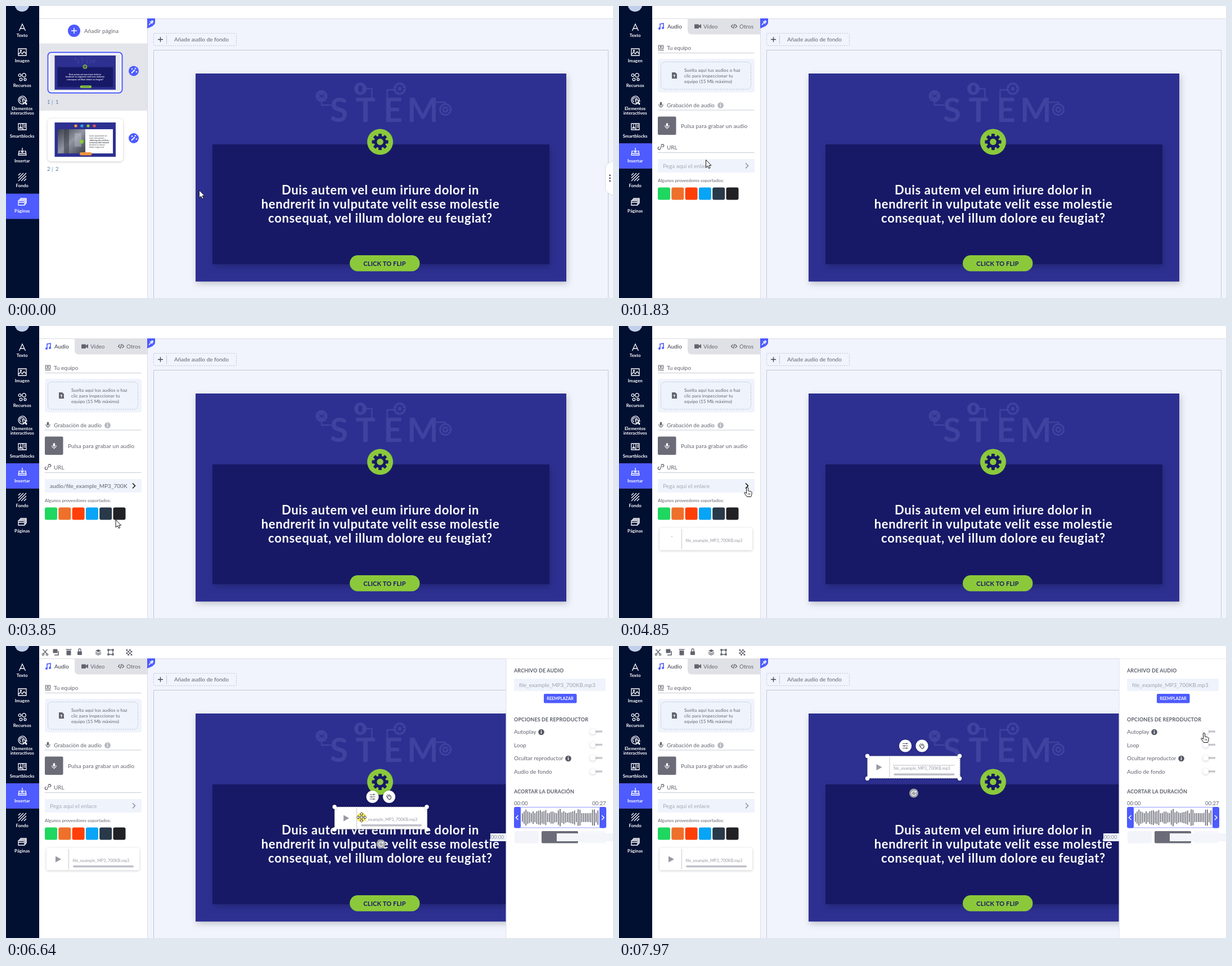
Animation of 1079x519 px, one loop 8000 ms. Source, as an HTML page:

```html
<!DOCTYPE html>
<html lang="es">
<head>
<meta charset="utf-8">
<style>
  html, body { margin: 0; width: 100%; height: 100%; overflow: hidden; background: #f1f4fc; }
  svg { display: block; width: 100%; height: 100%; font-family: Lato, sans-serif; }
  .menu { font-family: "Open Sans", sans-serif; }
  .soft { filter: drop-shadow(0 1px 2px #0003); }
  .deep { filter: drop-shadow(2px 4px 6px #0003); }
  .hard { filter: drop-shadow(2px 2px 1px #0006); }
</style>
</head>
<body>
<svg id="stage" viewBox="0 0 1079 519"></svg>
<script>
const BLUE = '#4d5bff', GREY = '#6b6c78', INK = '#62646f', PALE = '#eff3fc';
const NAVY = '#2d3091', DARK = '#171966', GREEN = '#8bc93b', GHOST = '#40429f';
const FILE = 'file_example_MP3_700KB.mp3';

// Drawing helpers: each returns SVG markup.
const rect = (x, y, w, h, fill, rx = 0, extra = '') =>
  `<rect x="${x}" y="${y}" width="${w}" height="${h}" fill="${fill}" rx="${rx}" ${extra}/>`;
const disc = (x, y, r, fill, extra = '') => `<circle cx="${x}" cy="${y}" r="${r}" fill="${fill}" ${extra}/>`;
const text = (x, y, str, size = 10, fill = INK, extra = '') =>
  `<text x="${x}" y="${y}" font-size="${size}" fill="${fill}" ${extra}>${str}</text>`;
const shape = (x, y, d, fill, extra = '') => `<path transform="translate(${x} ${y})" d="${d}" fill="${fill}" ${extra}/>`;
const icon = (x, y, d, color = '#fff', width = 1.3) => shape(x, y, d, 'none', `stroke="${color}" stroke-width="${width}"`);
const line = (x1, y1, x2, y2, color, width = 1) => icon(0, 0, `M${x1} ${y1}L${x2} ${y2}`, color, width);
const ring = (x, y, r) => `M${x - r} ${y}a${r} ${r} 0 1 0 ${2 * r} 0a${r} ${r} 0 1 0 ${-2 * r} 0`;
const box = (x, y, w, h) => `M${x} ${y}h${w}v${h}h${-w}z`;
const group = (id, body, extra = '') => `<g id="${id}" ${extra}>${body}</g>`;
const bold = 'font-weight="700"', mid = 'text-anchor="middle"';
const dashed = (color, gap = '2 2') => `stroke="${color}" stroke-dasharray="${gap}"`;

function gear(x, y, r, color, hole) {
  let teeth = '';
  for (let a = 0; a < 360; a += 45)
    teeth += rect(-r * .2, -r, r * .4, r * .5, color, r * .06, `transform="rotate(${a})"`);
  return `<g transform="translate(${x} ${y})">${teeth}${disc(0, 0, r * .74, color)}${disc(0, 0, r * .4, hole)}</g>`;
}

const info = (x, y, color) => disc(x, y, 5.3, color) + rect(x - .7, y - 1, 1.4, 4, '#fff') + disc(x, y - 2.6, .9, '#fff');
const wand = y => disc(227, y, 9, BLUE) + line(223, y + 4, 229, y - 2, '#fff', 2) +
  icon(227, y, 'M3-6v3M1.500-4.500h3M5 0v3M3.500 1.500h3M-3-5v3M-4.500-3.500h3', '#fff', 1);
const mic = (x, y, color) => rect(x - 1.7, y - 5, 3.4, 6.5, color, 1.7) + icon(x, y, 'M-3.500-1v1a3.500 3.500 0 0 0 7 0v-1M0 3.500v2', color, 1.1);

function slideArt() {
  const label = (y, str) => text(665.5, y, str, 22, '#fff', `${bold} ${mid} letter-spacing=".65"`);
  const letters = [['S', 592], ['T', 639], ['E', 688], ['M', 741]]
    .map(([c, x]) => text(x, 206, c, 59, GHOST, `${bold} ${mid}`)).join('');
  return rect(337, 120, 659, 369.5, NAVY) + letters +
    icon(0, 0, 'M561 165V176H578M636 147H650.500V164M695 149H677.500V164M757 171H781V178', GHOST, 2.5) +
    disc(561, 160, 10.5, GHOST) + icon(561, 160, ring(0, 0, 2) + 'M-6-5L6 5M6-5L-6 5M-6 0H6', NAVY, 1) +
    disc(630, 147, 11, GHOST) + rect(626.5, 141, 7, 12, NAVY, 3.5) +
    disc(700, 147, 11, GHOST) + gear(700, 147, 8, NAVY, GHOST) +
    disc(781, 184, 9.5, NAVY, `stroke="${GHOST}" stroke-width="3"`) + gear(781, 184, 6, GHOST, NAVY) +
    rect(367, 246, 599, 213, DARK, 0, 'class="deep"') +
    disc(665, 241.500, 23, GREEN) + gear(665, 241.500, 14.5, DARK, GREEN) +
    label(335, 'Duis autem vel eum iriure dolor in') +
    label(360, 'hendrerit in vulputate velit esse molestie') +
    label(385, 'consequat, vel illum dolore eu feugiat?') +
    rect(611, 443, 124.5, 28.5, GREEN, 14.25) +
    text(673, 462, 'CLICK TO FLIP', 11, DARK, `${bold} ${mid} letter-spacing=".15"`);
}

function sidebar() {
  const items = [
    [38, 55, 'Texto', 'M-5.500 6L0-6 5.500 6M-3.500 2H3.500'],
    [82, 100, 'Imagen', box(-7, -6, 14, 12) + 'M-7 4l4-4 3 3 3-4 4 4' + ring(-2.5, -2.5, 1)],
    [126, 144, 'Recursos', ring(-4.5, -3, 2.3) + ring(3, -3, 3.4) + ring(-2.5, 4.5, 2.3) + ring(5, 4.5, 2)],
    [167, 185, 'Elementos', 'M4 6a7 7 0 1 1 3-5M-2 3.500a4 4 0 1 1 5.500-4M0-1l2 8 2-3 3 4 1-1-3-4 3-1z'],
    [215, 234, 'Smartblocks', box(-7, -6, 14, 11) + 'M1-6V5M-5 2l2-3 2 3zM3-3h3M3 0h3M-4-3.500h2'],
    [259, 278, 'Insertar', 'M-4-1h-2l-1 7h14l-1-7h-2M-7 3h14M0-7v8M-3-2l3 3 3-3'],
    [304, 322, 'Fondo', 'M-7-3l4-4M-7 2l9-9M-7 7L7-7M-2 7l9-9M3 7l4-4'],
    [348, 367, 'Páginas', box(-7, -2, 11, 8) + 'M-5-2v-2h11v8h-2M-3-4v-2h10v8h-1M-7 1h11']
  ];
  return rect(0, 0, 59, 519, '#010f31') + disc(28.5, -3, 13, '#c3d0ea') +
    rect(0, 0, 59, 45, BLUE, 0, 'id="active"') +
    items.map(([y, ty, name, d]) => icon(29, y, d) + text(28.7, ty, name, 8, '#fff', `${bold} ${mid}`)).join('') +
    text(28.7, 193, 'interactivos', 8, '#fff', `${bold} ${mid}`);
}

function pagesPanel() {
  const number = (y, n) => text(73, y, n, 9.5, '#5878a8') + text(81, y, '|', 9.5, '#4d8bd0') + text(88, y, n, 9.5, '#5878a8');
  const words = ['Lorem ipsum dolor sit', 'amet consectetuer', 'adipiscing elit, sed diam', 'nonummy nibh euismod', 'tincidunt ut laoreet', 'dolore magna erat'];
  const dots = ['#f39a3c', '#2ea6e8', GREEN, '#ef5050'].map((c, i) => disc(124 + i * 11, 213, 2.6, c)).join('');
  return disc(121, 44, 11, BLUE) + icon(121, 44, 'M-5 0H5M0-5V5', '#fff', 1.5) +
    text(139, 48, 'Añadir página', 10, INK, 'letter-spacing=".1"') +
    rect(59, 66.5, 192, 119.5, '#e4e5ea') +
    rect(74.500, 82.500, 132, 72, '#fff', 6, `stroke="${BLUE}" stroke-width="2"`) + rect(78, 86, 125, 65, '#e9eaf0', 2) +
    `<g transform="translate(86.500 88) scale(.1646) translate(-337 -120)">${slideArt()}</g>` +
    wand(115.5) + number(174, 1) +
    rect(74, 200, 134, 76, '#fff', 6, 'class="soft"') + rect(86.5, 207, 108.5, 61, NAVY) + dots +
    rect(92, 219, 49, 43, 'url(#metal)') + rect(141, 219, 49, 43, '#fff') +
    rect(103, 219, 9, 43, '#30343f', 0, 'opacity=".5"') + rect(122, 226, 12, 24, '#c5c9d2', 0, 'opacity=".4"') +
    words.map((w, i) => text(148, 232 + i * 4, w, 3.3, '#41434d', i == 2 || i == 3 ? bold : '')).join('') +
    disc(134.5, 241, 3.5, GREEN) + rect(131, 260, 21.5, 5.5, '#ee9440', 2.7) + wand(235) + number(293, 2);
}

// The audio card is drawn with its top left corner at the origin.
const audioCard = (parts = s => s) => rect(0, 0, 165, 39.5, '#fff', 2, 'class="soft"') + line(39.500, 2, 39.500, 38, '#c6c8cf') +
  text(46.5, 24.5, FILE, 7.35, '#9899a3') +
  parts(shape(16, 14.5, 'M0 0L10 5.500 0 11z', '#9799a3') + rect(47, 31, 108, 3.4, '#bfc0c9', 1.7));

function insertPanel() {
  const heading = (y, str) => text(85, y, str) + line(69, y + 5.5, 240.500, y + 5.500, '#c9cbd4');
  const colors = ['#1ed760', '#ee702b', '#ff3f08', '#08a4f6', '#293949', '#202124'];
  return shape(0, 0, 'M122 22H251V50.500H130Q122 50.500 122 43z', '#e0e1e6') +
    icon(75, 36, 'M-2 4V-4L4-5V3', BLUE, 1.6) + disc(72, 40, 2, BLUE) + disc(78, 39, 2, BLUE) +
    text(86, 40, 'Audio', 10, '#353746') +
    rect(134, 32.5, 8, 7.5, INK, 1) + shape(142, 36, 'M0-1l4-3v8l-4-3z', INK) + text(150, 40, 'Vídeo') +
    icon(204.500, 36, 'M-2-3l-3 3 3 3M2-3l3 3-3 3M1-4l-2 8', INK) + text(214, 40, 'Otros') +
    icon(74.5, 74, box(-4, -4, 8, 6) + 'M-5 4.500H5M0-2V1M-1.500-1l1.500-1.500 1.500 1.500', INK, 1.2) + heading(78, 'Tu equipo') +
    rect(69, 94, 172, 59.5, PALE, 4) + rect(74.500, 99.500, 160, 48.5, 'none', 7, dashed('#b6bbc9')) +
    shape(94, 118, 'M0 0H6L9 3V11H0z', INK) + icon(98.500, 124, 'M0 3V-2M-2 0l2-2 2 2', '#fff', 1) +
    ['Suelta aquí tus audios o haz', 'clic para inspeccionar tu', 'equipo (15 Mb máximo)']
      .map((s, i) => text(116, 117 + i * 10, s, 8, INK, 'letter-spacing=".1"')).join('') +
    mic(74.5, 175.5, INK) + heading(179.5, 'Grabación de audio') + info(180.5, 176.5, '#b4b6c0') +
    rect(69, 196.5, 32.5, 32.5, GREY, 2) + mic(85.5, 213, '#fff') +
    text(110, 217, 'Pulsa para grabar un audio', 10, INK, 'letter-spacing=".1"') +
    icon(74.5, 251, 'M-1 1L2-2M0-3l1.500-1.500a2 2 0 0 1 3 3L3 0M0 2l-1.500 1.500a2 2 0 0 1-3-3L-3-1', INK, 1.3) + heading(255, 'URL') +
    rect(69, 272, 172, 24, PALE) + text(78, 288, 'Pega aquí el enlace', 10, '#a6aab7', 'id="hint"') +
    text(78, 288, 'audio/file_example_MP3_700K', 10, INK, 'id="pasted"') +
    icon(227.500, 284, 'M-2.500-4.500L2 0-2.500 4.500', '#8b8e9a', 1.5).replace('<path', '<path id="chevron"') +
    group('caret', line(78.500, 277, 78.500, 291, '#111')) +
    text(69, 313, 'Algunos proveedores soportados:', 8) +
    colors.map((c, i) => rect(69 + i * 24.3, 322.5, 22, 22, c, 3)).join('') +
    group('card', audioCard(s => group('loaded', s)) + disc(22, 15.5, .8, '#999', 'id="dot"'), 'transform="translate(72 359)"');
}

function workspace() {
  return rect(262.500, 78.500, 808, 460, 'none', 0, 'stroke="#c3c8d6"') +
    rect(262.500, 48.500, 147, 22, 'none', 2, dashed('#bcc1ce')) +
    icon(274.500, 59.500, 'M-4.500 0h9M0-4.500v9', '#41434d', 1.3) + line(285.500, 52, 285.500, 67, '#c3c8d6') +
    text(299, 63, 'Añade audio de fondo') +
    group('slide', rect(337, 120, 659, 369.5, NAVY, 0, 'class="deep"') + slideArt()) +
    group('handle', shape(0, 0, 'M1080 274.500L1070 280Q1065.500 283 1065.500 288V324Q1065.500 329 1070 332L1080 337.500', '#fff', 'stroke="#d9dce6"') +
      [301, 306, 311].map(y => disc(1073.5, y, 1.4, '#4b4d58')).join(''));
}

function toolbar() {
  const checks = [0, 1, 2, 3, 4, 5, 6, 7].map(i => rect(213.5 + i % 2 * 2.7 + (i >> 1) % 2 * 2.7 + (i % 2) * 2.7, 6 + (i >> 1) * 2.7, 2.7, 2.7, INK)).join('');
  return icon(69.500, 11, 'M-4-5L3 3M4-5L-3 3' + ring(-3.5, 4, 1.6) + ring(3.5, 4, 1.6), INK) +
    rect(83.5, 5.5, 8, 7, INK, 1) + icon(89, 11, 'M4-2V5H-3', INK, 1.6) +
    rect(107.5, 8, 8, 8.5, INK, 1) + rect(106.5, 5.5, 10, 1.5, INK) +
    rect(127, 9.5, 8, 6.5, INK, 1) + icon(131, 8, 'M-2 2V-1a2 2 0 0 1 4 0V2', INK) +
    shape(164, 11, 'M0-5L5-2.500 0 0-5-2.500z', INK) + icon(164, 11, 'M-5 0L0 2.500 5 0M-5 2.500L0 5 5 2.500', INK) +
    icon(186, 11, box(-4, -4, 8, 8), INK) + [-4, 4].map(a => [-4, 4].map(b => rect(184.3 + a, 9.3 + b, 3.4, 3.4, INK)).join('')).join('') + checks;
}

function audioElement() {
  const corners = [0, 164].map(x => [0, 40].map(y => disc(x, y, 3.7, '#fff', 'class="soft"')).join('')).join('');
  return audioCard() + rect(0, 0, 164.5, 40, 'none', 0, dashed('#8d8fa0')) + corners +
    line(46, 16.5, 155, 16.500, '#777a86').replace('/>', 'stroke-dasharray="1.500 1.500" id="guide"/>') +
    [67.5, 97].map(x => disc(x, -18, 11, '#fff', 'class="soft"')).join('') +
    icon(67.500, -18, 'M-5-4H5M-5 0H5M-5 4H5M2-5.500v3M-2-1.500v3M2 2.500v3', INK, 1.2) +
    icon(97, -18, 'M-1 4L-4 0M-3-4l4 4M-5-2l3 3M0-4l3 3a4 4 0 0 1-4 6', INK, 1.4) +
    disc(82.5, 66, 8, '#a2a3aa') + icon(82.500, 66, 'M3-2.500A4 4 0 1 0 4 1M4-4.500V-1.500H1', '#fff', 1.2);
}

function rightPanel() {
  const title = (y, str) => text(903, y, str, 9, '#5c5f6b', `${bold} letter-spacing=".12"`);
  const option = (y, str) => text(903, y + 4, str) + rect(1045, y - 1.7, 15, 3.4, '#c5c7ce') +
    disc(1043, y, 5, '#fff', 'class="soft"');
  let bars = '';
  for (let i = 0; i < 43; i++) {
    const h = 15 + 14 * Math.abs(Math.sin(i * 2.3) * Math.cos(i * .31) + .25 * Math.sin(i * 5));
    bars += rect(917 + i * 3.2, 305 - h / 2, 1.7, h, GREY);
  }
  return rect(889, 22.5, 191, 497, '#fff') + line(889, 22.500, 889, 519, '#dfe2ec') +
    title(47, 'ARCHIVO DE AUDIO') + rect(903, 58, 163, 22, PALE, 2) + text(912, 72.5, FILE, 9.9, '#a0a4b0') +
    rect(956, 85, 58.5, 16.5, BLUE, 2) + text(985, 96, 'REEMPLAZAR', 7.3, '#fff', `${bold} ${mid}`) +
    title(134, 'OPCIONES DE REPRODUCTOR') + option(152, 'Autoplay') + option(175.5, 'Loop') +
    option(199, 'Ocultar reproductor') + option(223, 'Audio de fondo') +
    info(951.5, 153, '#555763') + info(999.5, 200, '#555763') + title(262, 'ACORTAR LA DURACIÓN') +
    group('trim', text(903, 283, '00:00', 9.5) + text(1066.500, 283, '00:27', 9.5, INK, 'text-anchor="end"') +
      rect(904, 286.500, 162, 36.5, '#fff', 3, `stroke="${BLUE}" stroke-opacity=".6"`) + bars +
      rect(903, 286, 12, 37.5, BLUE, 3) + rect(1055, 286, 12, 37.5, BLUE, 3) +
      icon(908.500, 305, 'M2-4L-2 0 2 4', '#fff', 1.5) + icon(1061, 305, 'M-2-4L2 0-2 4', '#fff', 1.5) +
      rect(904, 329, 43, 21.5, '#f3f4f9', 2) + rect(952, 329, 65, 21.5, GREY, 2) + rect(1022, 329, 44, 21.5, '#f6f7fb', 2) +
      rect(861, 333, 29, 14, PALE) + rect(979, 333, 101, 14, '#f3f5fb') + text(862, 343, '00:00', 9, '#8e919d'));
}

function contextMenu() {
  const off = '#6d6d6d', on = '#000';
  const items = [
    [298, 'Des_hacer', off], [319, 'Cor_tar', on], [335, '_Copiar', on], [352, '_Pegar', on], [368, '_Eliminar', off],
    [388, 'Selecciona_r todo', off], [409, 'Compro_bar ortografía', on], [429, 'Inspeccionar e_lemento', on], [449, 'Tavino Screengrab', on]
  ];
  const underline = s => s.replace(/_(.)/, '<tspan text-decoration="underline">$1</tspan>');
  return rect(159.500, 284.500, 138, 171.5, '#f1f1f1', 0, 'stroke="#a5a5a5" class="hard"') +
    items.map(([y, s, c]) => text(185, y, underline(s), 8.5, c)).join('') +
    [304.5, 374.5, 395.5, 415.5, 436.5].map(y => line(182, y, 295, y, '#d2d2d2')).join('') +
    rect(165, 440, 11, 11, '#2a9db0') + icon(286, 445.500, 'M-1.500-3L1.500 0-1.500 3', '#222', 1);
}

const cursors = {
  arrow: shape(.5, .5, 'M0 0V13.500L3.200 10.600 5.300 15.200 7.500 14.200 5.500 9.800H9.500z', '#fff', 'stroke="#111"'),
  hand: shape(0, 1, 'M-1.500 1a1.500 1.500 0 0 1 3 0v5l5 1.200q2 .6 1.800 2.600l-.8 4.400-1 2.300h-7l-4.500-6q-.8-1.600.8-1.800l2.700 1.800z', '#fff', 'stroke="#111"') +
    icon(0, 0, 'M2 11v3M4.500 11v3', '#111', .8),
  beam: icon(0, 5, 'M-2-6h4M0-6V6M-2 6h4', '#222', 1),
  move: disc(0, 0, 8.5, '#ffe93c', 'opacity=".85"') + shape(0, 0,
    'M0-9l3 3.500H1V-1H5.500V-3L9 0 5.500 3V1H1V5.500H3L0 9-3 5.500H-1V1H-5.500V3L-9 0-5.500-3V-1H-1V-5.500H-3z', '#fff', 'stroke="#333" stroke-width=".9"')
};

document.getElementById('stage').innerHTML =
  `<defs><linearGradient id="metal" x2="1" y2="1"><stop stop-color="#3b3f4b"/><stop offset=".5" stop-color="#9297a3"/><stop offset="1" stop-color="#3a3d48"/></linearGradient></defs>` +
  rect(0, 0, 1079, 519, '#f1f4fc') + workspace() + group('element', audioElement()) +
  rect(59, 0, 1020, 22, '#fff') + line(59, 22.500, 1079, 22.500, '#d9dce6') + group('tools', toolbar()) +
  group('options', rightPanel()) +
  rect(59, 23, 192, 496, '#fff') + line(251.500, 22, 251.500, 519, '#d9dce6') +
  shape(0, 0, 'M251 22H265V30Q264 34 258 37L251 40z', BLUE) + icon(258, 29.500, 'M-4 4L-1 1M-2-2L2 2M0-1L2-3M1 1L3-1M1-4L4-1', '#fff', 1.6) +
  group('pages', pagesPanel()) + group('insert', insertPanel()) + sidebar() +
  group('menu', contextMenu(), 'class="menu"') +
  group('cursor', Object.entries(cursors).map(([k, s]) => group(k, s)).join(''));

// Key poses: [time, x, y]; motion eases between neighbours.
const pointerPath = [
  [140, 343, 327], [700, 36, 262], [1030, 30, 262], [1830, 154, 273], [1890, 154, 273], [2190, 149, 275],
  [2360, 150, 275], [2580, 158, 282], [2830, 159, 284], [2970, 168.5, 284.5], [3050, 168.5, 284.5], [3620, 194, 345],
  [3800, 194, 345], [4450, 227, 283], [4540, 228, 286], [4930, 228, 286], [5640, 160, 378], [5780, 160, 378],
  [6020, 343, 335], [6110, 343, 335], [6560, 626, 303], [6640, 632, 304.5], [6710, 632, 304.5], [7250, 489.5, 214],
  [7320, 489.5, 214], [7720, 1064, 157], [7900, 1064, 157], [7970, 1040, 154]
];
const elementPath = [[6710, 584, 286], [7250, 441.5, 195.5]];
const optionsPath = [[5940, 191, 0], [6020, 152, 0], [6110, 152, 0], [6400, 0, 0]];

function pose(path, t) {
  const i = path.findIndex(k => k[0] > t);
  if (i === 0) return path[0].slice(1);
  if (i < 0) return path[path.length - 1].slice(1);
  const [t0, x0, y0] = path[i - 1], [t1, x1, y1] = path[i];
  const p = (t - t0) / (t1 - t0), e = p * p * (3 - 2 * p);
  return [x0 + (x1 - x0) * e, y0 + (y1 - y0) * e];
}

const el = id => document.getElementById(id);
const show = (id, on) => { el(id).style.display = on ? '' : 'none'; };
const place = (id, [x, y]) => el(id).setAttribute('transform', `translate(${x} ${y})`);

function draw() {
  const t = performance.now() % 8000, within = (a, b) => t >= a && t < b;
  const inserted = t >= 860, pasted = within(3800, 4850), placed = t >= 5860;
  show('pages', !inserted);
  show('handle', !inserted);
  show('insert', inserted);
  place('active', [0, inserted ? 244 : 333.5]);
  show('menu', within(2830, 3800));
  show('caret', within(2360, 3800));
  show('pasted', pasted);
  show('hint', !pasted);
  el('chevron').setAttribute('stroke', within(2150, 5020) ? '#111' : '#8b8e9a');
  show('card', t >= 4850);
  show('dot', within(4850, 5100));
  show('loaded', t >= 5100);
  show('element', placed);
  show('tools', placed);
  show('guide', t >= 7250);
  place('element', pose(elementPath, t));
  show('options', t >= 5940);
  show('trim', t >= 6400);
  place('options', pose(optionsPath, t));

  const kind = within(6560, 7320) ? 'move' : within(1950, 2830) ? 'beam'
    : within(700, 1150) || within(4540, 5000) || within(5400, 5860) || t >= 7700 ? 'hand' : 'arrow';
  for (const k in cursors) show(k, k === kind);
  place('cursor', pose(pointerPath, t));
  requestAnimationFrame(draw);
}
draw();
</script>
</body>
</html>
```
